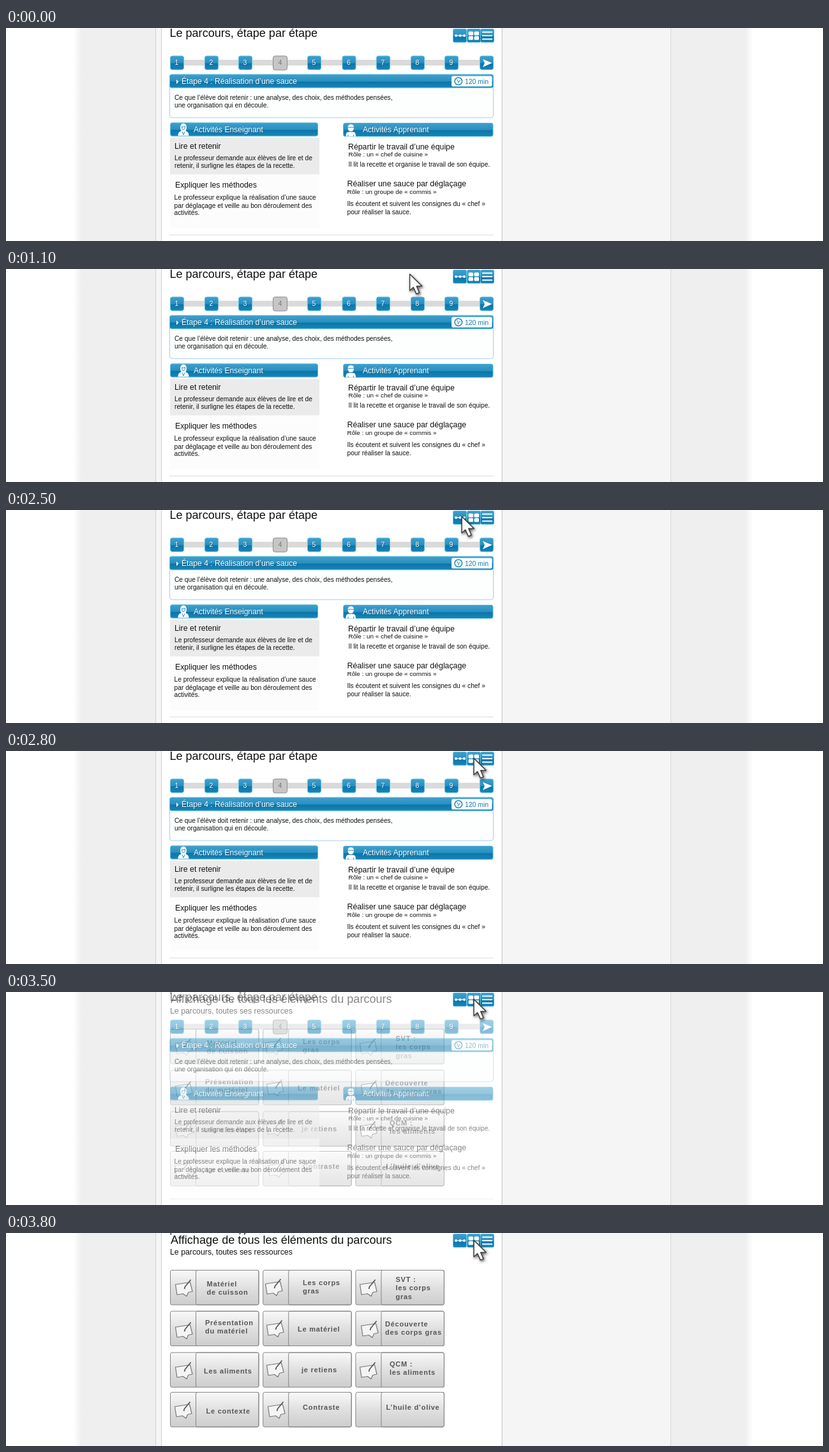
Animation of 1280 by 335 pixels, one loop 8000 ms. Source, as an HTML page:

```html
<!DOCTYPE html>
<html lang="fr">
<head>
<meta charset="utf-8">
<title>Le parcours, étape par étape</title>
<style>
html, body { margin: 0; width: 100%; height: 100%; overflow: hidden; background: #fff; }
svg { display: block; width: 100%; height: 100%; }
text { font-family: "Liberation Sans", Arial, sans-serif; white-space: pre; }
</style>
</head>
<body>
<svg viewBox="0 0 1280 335">
  <defs>
    <linearGradient id="blue" x2="0" y2="1">
      <stop offset="0" stop-color="#3f9fcb"/>
      <stop offset=".5" stop-color="#2a90c0"/>
      <stop offset=".56" stop-color="#0b76ab"/>
      <stop offset="1" stop-color="#1885b7"/>
    </linearGradient>
    <linearGradient id="tile" x2="0" y2="1">
      <stop offset="0" stop-color="#f9f9f9"/>
      <stop offset=".5" stop-color="#e0e0e0"/>
      <stop offset="1" stop-color="#cdcdcd"/>
    </linearGradient>
    <linearGradient id="edge">
      <stop offset="0" stop-color="#fff"/>
      <stop offset="1" stop-color="#efefef"/>
    </linearGradient>
    <filter id="shade" x="-60%" y="-40%" width="220%" height="190%">
      <feDropShadow dx="1.5" dy="2" stdDeviation="2.2" flood-color="#000" flood-opacity=".65"/>
    </filter>
  </defs>
  <g id="page"></g>
  <g id="grid"></g>
  <g id="steps"></g>
  <g id="tools"></g>
  <g id="cursor" filter="url(#shade)">
    <path d="M0 0V26L5.6 20.8L10.4 31.2L15 29.2L10.6 19H19.2Z" fill="#fff" stroke="#3c3c3c" stroke-width="1.5" stroke-linejoin="round"/>
  </g>
</svg>
<script>
const $ = id => document.getElementById(id);
const rect = (x, y, w, h, fill, extra = '') =>
  `<rect x="${x}" y="${y}" width="${w}" height="${h}" fill="${fill}" ${extra}/>`;
const path = (d, extra) => `<path d="${d}" ${extra}/>`;
const text = (x, y, size, str, fill = '#111', extra = '') =>
  `<text x="${x}" y="${y}" font-size="${size}" fill="${fill}" ${extra}>${str}</text>`;
const glossy = (x, y, w, h, r = 3) =>
  rect(x + .5, y + .5, w - 1, h - 1, 'url(#blue)', `rx="${r}" stroke="#5cbfe4"`);
const raised = (x, y, size, str, extra) =>
  text(x + .6, y + .8, size, str, '#0a5e8a', extra) + text(x, y, size, str, '#fff', extra);

function drawPage() {
  return rect(106, 0, 12, 335, 'url(#edge)') + rect(118, 0, 1042, 335, '#efefef') +
    rect(1158, 0, 12, 335, 'url(#edge)', 'transform="rotate(180 1164 167.5)"') +
    rect(234, 0, 808, 335, '#f5f5f5') + rect(243, 0, 535, 335, '#d2d2d2') +
    rect(244, 0, 532.5, 335, '#fff') + rect(234, 0, 1, 335, '#d0d0d0') + rect(1041, 0, 1, 335, '#d6d6d6');
}

function drawTools() {
  const dots = [705, 711.5, 718].map(x => `<circle cx="${x}" cy="12" r="2"/>`).join('');
  const squares = [[724.5, 5.5], [733.5, 5.5], [724.5, 12.8], [733.5, 12.8]]
    .map(([x, y]) => rect(x, y, 7.5, 6, '#fff', 'rx="1.5"')).join('');
  const lines = [5.5, 11, 16.5].map(y => rect(746, y, 16, 2, '#fff')).join('');
  return [700, 722, 743].map(x => glossy(x, 1, 22, 22, 2)).join('') +
    `<g fill="#fff">${rect(703, 11.4, 17, 1.2, '#fff')}${dots}</g>` + squares + lines;
}

function drawRail() {
  const xs = [257, 311, 364, 418, 472, 526.5, 580, 634, 687];
  const boxes = xs.map((x, i) => i == 3
    ? rect(x + .5, 44, 22, 22, '#c6c6c6', 'rx="3" stroke="#8b8b8b"') +
      text(x + 11.5, 58, 10.5, 4, '#777', 'text-anchor="middle"')
    : glossy(x, 43.5, 22, 22.5) + raised(x + 10.5, 58, 10.5, i + 1, 'text-anchor="middle"'));
  return rect(268, 50, 484, 9, '#dadada') + boxes.join('') + glossy(742, 43.5, 22, 22.5) +
    path('M747 49L761.5 55L747 61.5L750 55Z', 'fill="#fff"');
}

function drawSteps() {
  const teacher = path('M269.5 169.5C269.5 164 272 163 274.5 162C272.5 159 272 150 278 150S283.500 159 281.500 162C284 163 286.500 164 286.500 169.500Z', 'fill="#fff"') +
    path('M275.500 155Q278 156 280.500 154.500Q280.500 160 278 160T275.500 155M276 163L278 168L280 163', 'fill="none" stroke="#2a8cbc"');
  const pupil = path('M532.500 170.500C532.500 165 534 163.500 537.500 163.500H543C546.500 163.500 548 165 548 170.500ZM535.500 156.500Q535.500 151.500 540.300 151.500T545 156.500Q545 162.500 540.300 162.500T535.500 156.500', 'fill="#fff"') +
    path('M535.500 156.200H545M536 168V170.500M544.500 168V170.500', 'stroke="#2a8cbc"');
  const clock = `<circle cx="708.8" cy="83.7" r="5.8" fill="none" stroke="#2484b4" stroke-width="1.500"/>` +
    path('M706.500 80.500L708.500 84.500L712 82.500M708.500 84.500V87', 'fill="none" stroke="#2484b4"');
  const lines = [
    [264, 113, 10.2, 'Ce que l’élève doit retenir : une analyse, des choix, des méthodes pensées,'],
    [264, 125, 10.2, 'une organisation qui en découle.'],
    [264, 189.5, 12.35, 'Lire et retenir'],
    [264, 207.5, 10.22, 'Le professeur demande aux élèves de lire et de'],
    [264, 219.5, 10.22, 'retenir, il surligne les étapes de la recette.'],
    [265, 250.5, 12.3, 'Expliquer les méthodes'],
    [263.5, 270, 10.25, 'Le professeur explique la réalisation d’une sauce'],
    [263.5, 282.5, 10.25, 'par déglaçage et veille au bon déroulement des'],
    [263.5, 294, 10.25, 'activités.'],
    [536, 190.5, 12.3, 'Répartir le travail d’une équipe'],
    [536.5, 202, 9.9, 'Rôle : un « chef de cuisine »'],
    [536.5, 218, 10.1, 'Il lit la recette et organise le travail de son équipe.'],
    [534.5, 249, 12.3, 'Réaliser une sauce par déglaçage'],
    [534.5, 261, 9.9, 'Rôle : un groupe de « commis »'],
    [534.5, 280, 10.2, 'Ils écoutent et suivent les consignes du « chef »'],
    [534.5, 292.500, 10.2, 'pour réaliser la sauce.']
  ].map(a => text(...a)).join('');
  return text(256.500, 14, 18.05, 'Le parcours, étape par étape') + drawRail() +
    rect(256.5, 73.5, 507, 67.5, '#fdfefe', 'rx="4" stroke="#a3d0e3"') +
    glossy(256, 72.5, 508, 22) + path('M267 81L270.500 84.500L267 88Z', 'fill="#fff"') +
    raised(275, 88, 12.17, 'Étape 4 : Réalisation d’une sauce') +
    rect(698, 75.5, 63.5, 16.5, '#fafdfe', 'rx="2.500"') + clock + text(719, 87.5, 10.4, '120 min', '#1c7db0') +
    glossy(257, 148.5, 232, 22) + teacher + raised(294, 164, 12.1, 'Activités Enseignant') +
    glossy(528, 149, 235.5, 22) + pupil + raised(559, 164, 12.1, 'Activités Apprenant') +
    rect(257, 173, 234, 57.5, '#ebebeb') + rect(257, 230.5, 234, 84.5, '#fcfcfc') +
    lines + rect(256, 325, 508, 1, '#dedede');
}

// Each tile: label position, label lines, icon centre
const tiles = [
  [314.5, 83.5, 'Matériel|de cuisson', 279, 86],
  [465, 82, 'Les corps|gras', 420, 85],
  [610.5, 77, 'SVT :|les corps|gras', 568, 86],
  [312, 145, 'Présentation|du matériel', 279, 153],
  [457, 155, 'Le matériel', 422, 150],
  [594, 146.5, 'Découverte|des corps gras', 570, 151],
  [310, 220.5, 'Les aliments', 279, 216],
  [463, 218.5, 'je retiens', 422, 213],
  [601, 210, 'QCM :|les aliments', 568, 216],
  [313.5, 283.5, 'Le contexte', 278, 278],
  [465, 278, 'Contraste', 424, 278],
  [595.5, 278, 'L’huile d’olive']
];
const tops = [58.5, 123, 188, 250.5];

const bubble = (x, y) => `<g transform="translate(${x} ${y})" stroke-linejoin="round">` +
  path('M-13.500 -5L9.500 -8.500L13 6L6.500 7.500L4 13.500L-1.500 9.500L-11 11Z', 'fill="#f4f4f4" stroke="#777" stroke-width="1.200"') +
  path('M10.500 -12.500L1.500 -1.500L.5 2', 'fill="none" stroke="#555" stroke-width="1.700"') + '</g>';

function drawTile([x, y, label, ix, iy], i) {
  const left = 257.5 + i % 3 * 145.2, top = tops[i / 3 | 0];
  const words = label.split('|').map((s, n) =>
    text(x, y + n * 13.4, 11, s, '#555', 'font-weight="bold" letter-spacing=".75"'));
  return rect(left, top, 138.5, 54.5, 'url(#tile)', 'rx="2.500" stroke="#858585"') +
    rect(left + 40, top, 98.5, 54.5, 'none', 'rx="2.500" stroke="#858585"') +
    (ix ? bubble(ix, iy) : '') + words.join('');
}

function drawGrid() {
  return path('M257 1.500H259.500M366 2L367 0M373 2.500L375 0', 'stroke="#222" stroke-width="1.300"') +
    text(258, 17, 18.1, 'Affichage de tous les éléments du parcours') +
    text(257, 34, 12.33, 'Le parcours, toutes ses ressources') + tiles.map(drawTile).join('');
}

$('page').innerHTML = drawPage();
$('grid').innerHTML = drawGrid();
$('steps').innerHTML = drawSteps();
$('tools').innerHTML = drawTools();

const LOOP = 8000, TICK = 100;
const clamp = (v, lo, hi) => Math.min(hi, Math.max(lo, v));

function render(ms) {
  const tick = Math.floor(ms % LOOP / TICK);
  const go = clamp(tick - 4, 0, 11), hop = clamp(tick - 24, 0, 4) / 4;
  const x = 501 + go * 18.8 + hop * 25.2;
  const y = 9 + 3 * Math.cos(go * Math.PI / 5) - 1.6 * Math.sin(hop * Math.PI);
  $('cursor').setAttribute('transform', `translate(${x} ${y})`);
  $('cursor').setAttribute('opacity', clamp(tick / 4, 0, 1));
  const fade = clamp(tick - 32, 0, 6) / 6;
  $('grid').setAttribute('opacity', fade);
  $('steps').setAttribute('opacity', 1 - fade);
}

const start = performance.now();
(function loop() {
  render(performance.now() - start);
  requestAnimationFrame(loop);
})();
</script>
</body>
</html>
```
